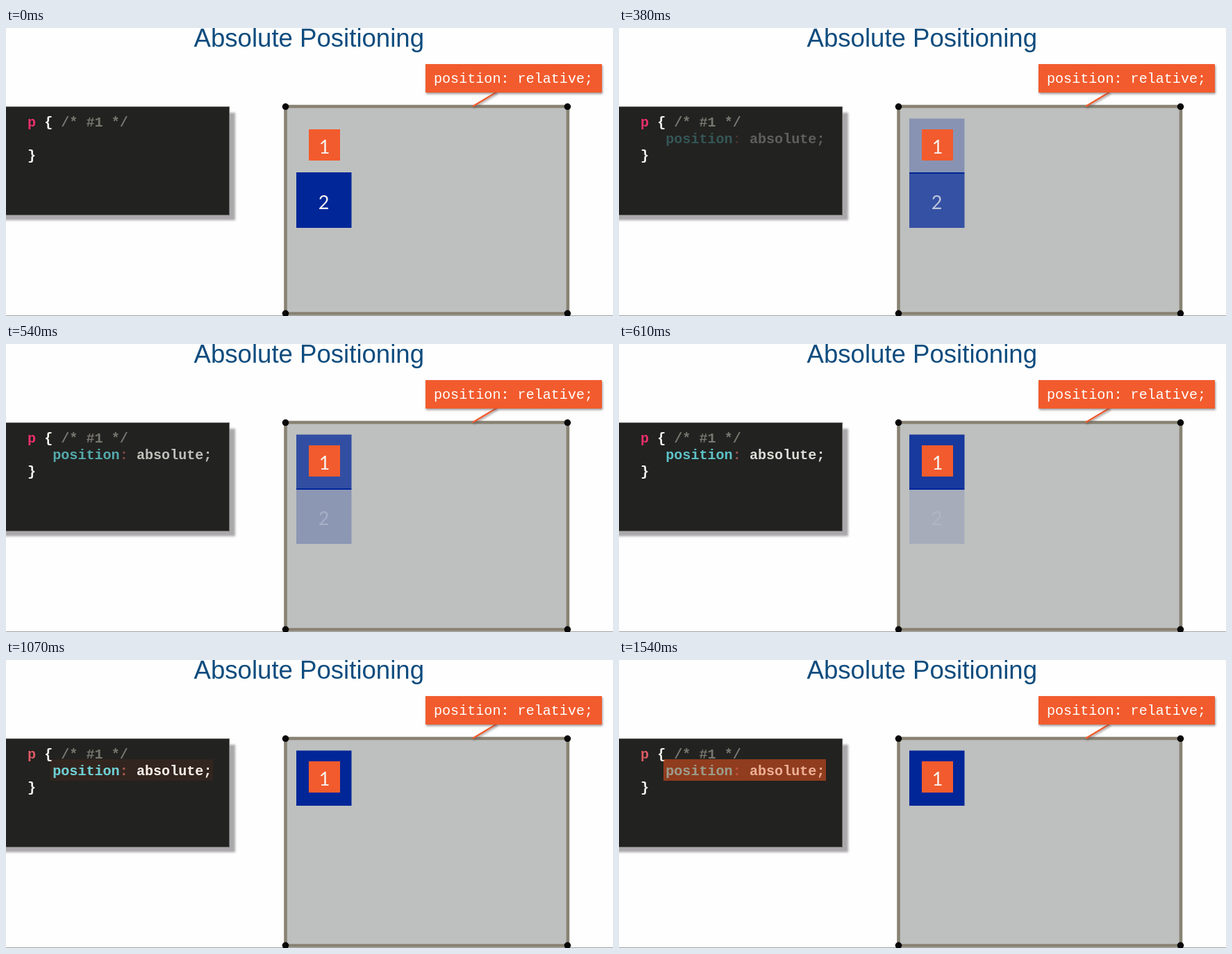
Recreate the animation shown at these times as an HTML page with a canvas. Size 874x415 px, loop 1.62 s.

```html
<!DOCTYPE html>
<html lang="en">
<head>
<meta charset="utf-8">
<title>Absolute Positioning</title>
<style>
  html, body { margin: 0; width: 100%; height: 100%; overflow: hidden; background: #fefefe; }
  canvas { display: block; width: 874px; height: 415px; }
</style>
</head>
<body>
<canvas id="stage" width="874" height="415"></canvas>
<script>
const ctx = document.getElementById('stage').getContext('2d');
const LOOP = 1620;
const STEPS = [0, 150, 230, 310, 390, 460, 540, 610, 690, 1070, 1150, 1230, 1300, 1380, 1460, 1540];
const MONO = '"Liberation Mono", "Courier New", monospace';
const SANS = '"Liberation Sans", Arial, sans-serif';
const HUMAN = 'Lato, Carlito, sans-serif';
const ORANGE = '#f25b2d', BLUE = '#002698', PITCH = 12.07;

const clamp = v => Math.min(1, Math.max(0, v));

function rect(x, y, w, h, color, alpha = 1) {
  ctx.globalAlpha = alpha;
  ctx.fillStyle = color;
  ctx.fillRect(x, y, w, h);
  ctx.globalAlpha = 1;
}

function text(str, x, y, font, color, align = 'left', alpha = 1) {
  ctx.globalAlpha = alpha;
  ctx.font = font;
  ctx.textAlign = align;
  ctx.fillStyle = color;
  ctx.fillText(str, x, y);
  ctx.globalAlpha = 1;
}

function withShadow(dx, dy, blur, color, draw) {
  ctx.save();
  ctx.shadowOffsetX = dx;
  ctx.shadowOffsetY = dy;
  ctx.shadowBlur = blur;
  ctx.shadowColor = color;
  draw();
  ctx.restore();
}

function code(str, col, row, color, alpha = 1) {
  text(str, 31 + col * PITCH, 141.5 + row * 24, 'bold 20.1px ' + MONO, color, 'left', alpha);
}

function declaration(alpha) {
  code('position', 3, 1, '#66d9e0', alpha);
  code(':', 11, 1, '#a85a52', alpha);
  code('absolute;', 13, 1, '#f8f8f2', alpha);
}

function panel(time, reveal, mark) {
  withShadow(8, 8, 3, '#aaa8aa', () => rect(-10, 114, 332, 155, '#222220'));
  ctx.strokeStyle = '#6a6a68';
  ctx.lineWidth = 1;
  ctx.strokeRect(-10.5, 113.5, 332, 156);
  code('p', 0, 0, time < 690 ? '#ea2f6d' : '#dc5a64');
  code('{', 2, 0, '#f8f8f2');
  code('/* #1 */', 4, 0, '#77766f');
  code('}', 0, 2, '#f8f8f2');
  declaration(reveal);
  if (mark) {
    rect(64, 143, 234, 31, '#e1501e', mark);
    declaration(0.25);
  }
}

function container() {
  rect(402.5, 113, 406.5, 298, '#bec0bf');
  ctx.strokeStyle = '#888273';
  ctx.lineWidth = 4.6;
  ctx.strokeRect(402.5, 113, 406.5, 298.5);
  rect(0, 414, 874, 1, '#a2a2a2');
  for (const x of [402.5, 808.5]) {
    for (const y of [113.3, 411.3]) {
      ctx.beginPath();
      ctx.arc(x, y, 4.8, 0, Math.PI * 2);
      ctx.fillStyle = '#080808';
      ctx.fill();
    }
  }
}

function callout() {
  withShadow(1, 2, 3, 'rgba(90,80,80,.6)', () => {
    ctx.beginPath();
    ctx.moveTo(707, 92);
    ctx.lineTo(672, 113);
    ctx.strokeStyle = ORANGE;
    ctx.lineWidth = 2.4;
    ctx.stroke();
    rect(604, 52, 254, 41, ORANGE);
  });
  text('position: relative;', 616, 78.5, '20.1px ' + MONO, '#fff');
}

function boxes(fade) {
  rect(418, 130.5, 79.5, 77.5, BLUE, fade);
  rect(418, 210, 79.5, 78, BLUE, 1 - fade);
  rect(418, 208, 79.5, 2, BLUE);
  text('2', 457.5, 261, '27px ' + HUMAN, '#f4f4f4', 'center', 1 - fade);
  rect(436, 146, 45, 45, ORANGE);
  text('1', 458.5, 181, '27px ' + HUMAN, '#f8f4f2', 'center');
}

function highlight(t) {
  if (t < 1070) return 0;
  const rise = clamp((t - 1045) / 185);
  return 0.62 * rise - 0.04 * clamp((t - 1230) / 310);
}

function draw(t) {
  const fade = t < 150 ? 0 : clamp(Math.max(0.02, (t - 165) / 510));
  rect(0, 0, 874, 415, '#fefefe');
  text('Absolute Positioning', 436.3, 27.3, '36.6px ' + SANS, '#0f4c7e', 'center');
  panel(t, fade, highlight(t));
  container();
  callout();
  boxes(fade);
}

const start = performance.now();

function tick() {
  const now = (performance.now() - start) % LOOP;
  draw(STEPS.filter(s => s <= now).pop() || 0);
  requestAnimationFrame(tick);
}
tick();
</script>
</body>
</html>
```
